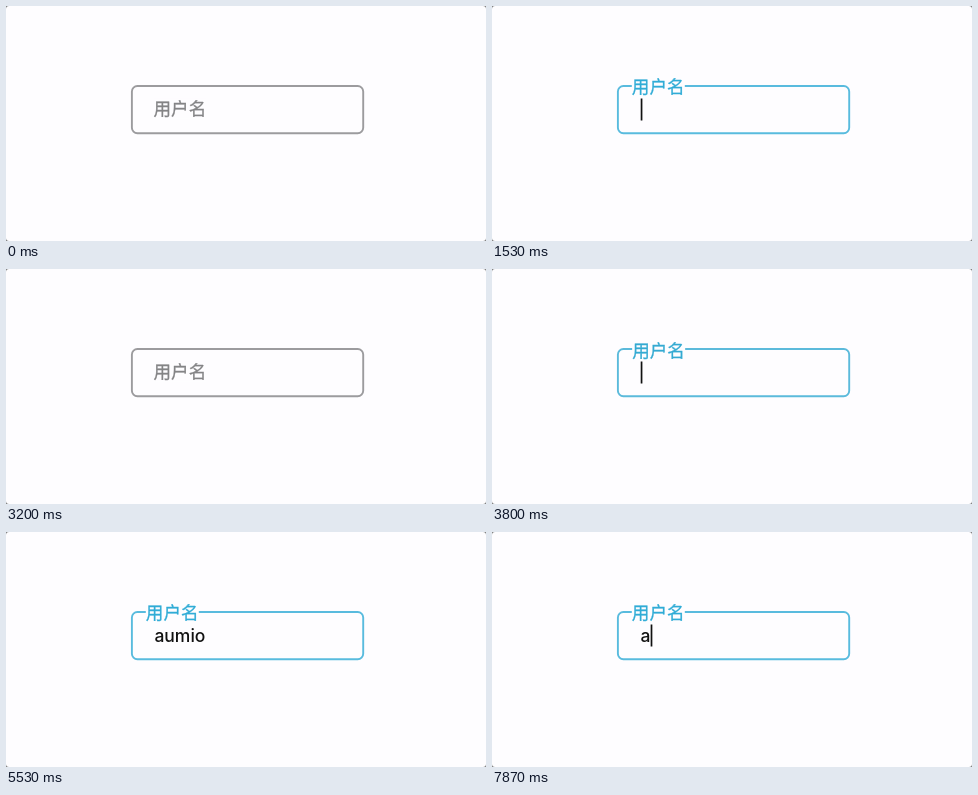
Write an HTML page that moves like this. It is 480 px wide and 235 px high and loops after 8 s.

```html
<!DOCTYPE html>
<html lang="zh">
<head>
<meta charset="utf-8">
<title>用户名</title>
<style>
  html, body { margin: 0; width: 100%; height: 100%; overflow: hidden; background: #777; }
  svg { display: block; width: 480px; height: 235px; }
  .page { fill: #fefdff; }
  .field { fill: none; stroke: currentColor; stroke-width: 1.9; stroke-opacity: 0.8; }
  .label text {
    font: 17.6px "Noto Sans CJK SC", "Noto Sans CJK", sans-serif;
    fill: currentColor; stroke: currentColor; stroke-width: 0.3;
  }
  .value { font: 500 17.5px Inter, "Liberation Sans", sans-serif; fill: #111; }
  .caret { fill: #111; }
</style>
</head>
<body>
<svg viewBox="0 0 480 235">
  <rect class="page" width="480" height="235" rx="3"/>
  <g id="box">
    <rect class="field" x="125.9" y="80" width="231.3" height="47.3" rx="5.5"/>
    <g class="label" id="label">
      <rect class="page" y="-10" width="53" height="20"/>
      <text y="6.7">用户名</text>
    </g>
  </g>
  <text class="value" id="value" x="148.4" y="110"></text>
  <rect class="caret" id="caret" y="92.5" width="1.7" height="22"/>
</svg>
<script>
const LOOP = 8000, STEP = 1000 / 15, FADE = 300;
const GREY = [132, 132, 134], BLUE = [48, 172, 214];
const WORD = "aumio";

const FOCUS = [[1180, 2872], [3580, Infinity]];
const CARET_OFF = [[2060, 2460], [5530, 6930], [7390, 7500]];
const KEYS = [4260, 4460, 4530, 4730, 5000];
const ERASE_START = 7500, ERASE_EVERY = 115;

const el = id => document.getElementById(id);
const box = el("box"), label = el("label"), value = el("value"), caret = el("caret");

const inside = (spans, t) => spans.some(([a, b]) => t >= a && t < b);
const mix = (a, b, p) => a + (b - a) * p;
const cubic = (a, b, u) => 3 * a * u * (1 - u) ** 2 + 3 * b * u * u * (1 - u) + u ** 3;

// CSS "ease"
function ease(x) {
  if (x <= 0) return 0;
  if (x >= 1) return 1;
  let lo = 0, hi = 1;
  for (let i = 0; i < 24; i++) {
    const mid = (lo + hi) / 2;
    if (cubic(0.25, 0.25, mid) < x) lo = mid; else hi = mid;
  }
  return cubic(0.1, 1, lo);
}

// 0 = resting inside the field, 1 = floated onto its border
function floated(t) {
  return FOCUS.reduce((p, [on, off]) =>
    p + ease((t - on) / FADE) - ease((t - off) / FADE), 0);
}

function lettersAt(t) {
  const typed = KEYS.filter(key => t >= key).length;
  const erased = Math.floor((t - ERASE_START) / ERASE_EVERY) + 1;
  return Math.max(1, typed - Math.max(0, erased)) * (typed > 0);
}

function draw(time) {
  const t = Math.floor((time % LOOP + 5) / STEP) * STEP % LOOP;

  const p = floated(t);
  box.style.color = `rgb(${GREY.map((c, i) => Math.round(mix(c, BLUE[i], p)))})`;
  label.setAttribute("transform", `translate(${mix(147.5, 139.8, p)} ${mix(102.2, 80.1, p)})`);

  value.textContent = WORD.slice(0, lettersAt(t));
  const width = value.textContent ? value.getComputedTextLength() : 0;
  const shown = inside(FOCUS, t) && !inside(CARET_OFF, t);
  caret.setAttribute("x", 148.7 + width);
  caret.setAttribute("visibility", shown ? "visible" : "hidden");
}

const begin = performance.now();
function tick() {
  draw(performance.now() - begin);
  requestAnimationFrame(tick);
}
tick();
</script>
</body>
</html>
```
